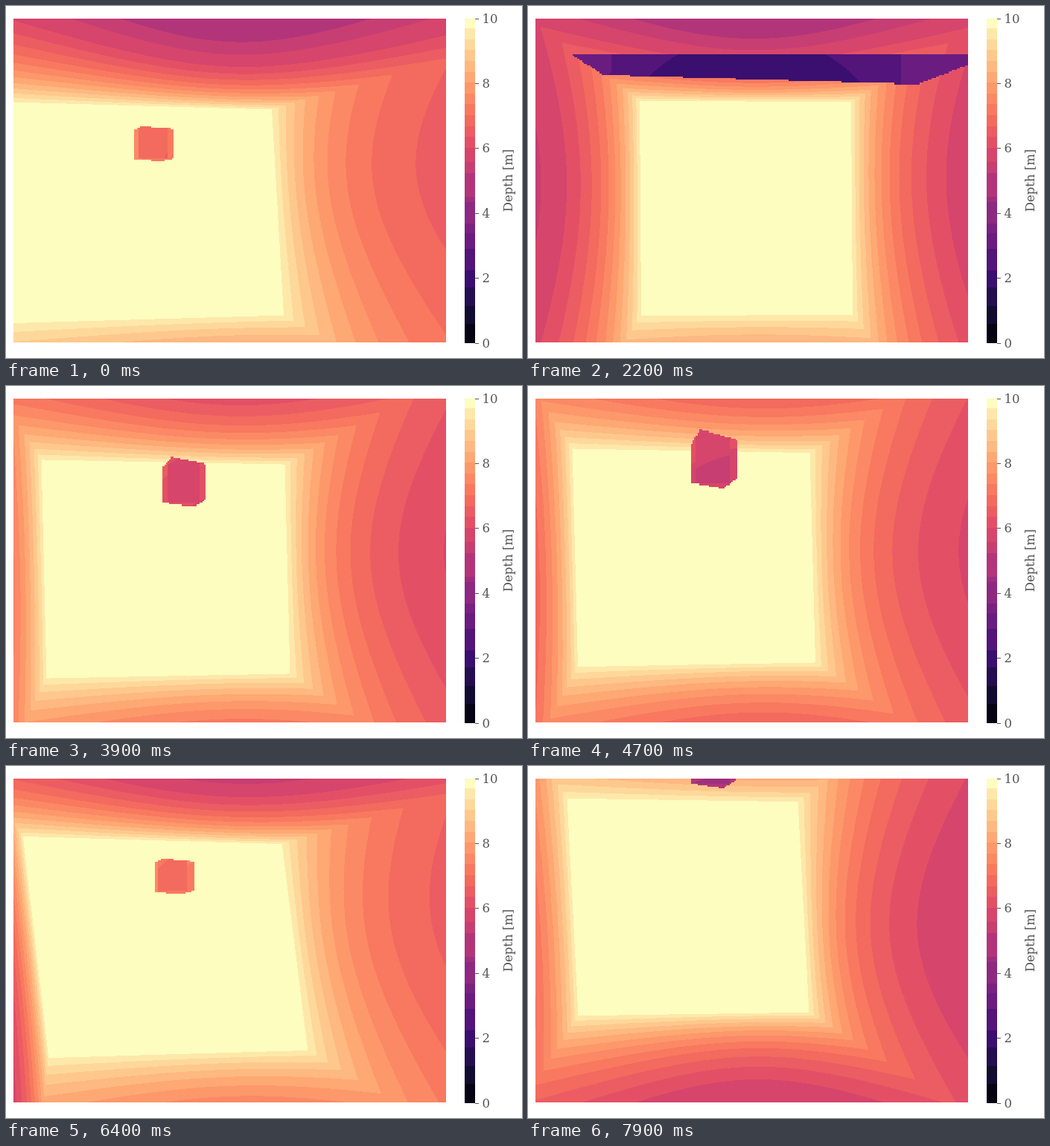
These frames come from a looping animation (693x474 px, 8000 ms). An HTML page with a canvas:

```html
<!DOCTYPE html>
<html>
<head>
<meta charset="utf-8">
<style>
html, body { margin: 0; width: 693px; height: 474px; overflow: hidden; background: #fff; }
canvas { display: block; }
</style>
</head>
<body>
<canvas id="stage" width="693" height="474"></canvas>
<script>
const g = document.getElementById('stage').getContext('2d');
const LEFT = 10, TOP = 17, W = 581, H = 436, CX = 300.5, CY = 235;
const FAR = 9.7;      // depth where the palest band starts
const OPENING = 288;  // height of the far opening on screen
const BEND = 120;     // how soon the contours start to curve
const FOCAL = 315, CELL = 2.15;

// Depth bands: even steps down to 6 m, coarser ones below.
const starts = Array.from({ length: 12 }, (_, i) => FAR - i * 0.3345)
  .concat(5.58, 5.24, 4.51, 4.35, 3.68, 3.39, 2.91, 2.24, 1.72, 1.14, 0.6, 0);
const stops = ['000004', '150e37', '3b0f70', '651a80', '8c2981', 'b73779', 'de4968', 'f7705c', 'fe9f6d', 'fecf92', 'fcfdbf']
  .map(h => [0, 2, 4].map(i => parseInt(h.slice(i, i + 2), 16)));
const mix = (a, b, k) => a.map((v, i) => v + (b[i] - v) * k);
const shade = d => {
  const i = Math.min(9, Math.floor(d));
  return mix(stops[i], stops[i + 1], d - i).map(Math.round);
};
const colors = starts.map((s, i) => shade(i ? (s + starts[i - 1]) / 2 : 10));
const lut = Uint32Array.from({ length: 1001 }, (_, i) => {
  const [r, gr, b] = colors[starts.findIndex(s => i / 100 >= s)];
  return (255 << 24 | b << 16 | gr << 8 | r) >>> 0;
});

// Key poses. room: opening centre x, y, width, lean, ceiling and left wall distance.
// block: left, right, top, bottom, distance, and 1 when seen as an overhead slab.
const keys = [
  { t: 0,    room: [175, 278, 380, 16, 4.6, 2.4],    block: [172, 226, 161, 208, 6.42, 0] },
  { t: 1100, room: [286.5, 254, 284, 2, 4.58, 5.7],  block: [183, 437, -2, 40, 1.9, 1] },
  { t: 2200, room: [293, 272.5, 284, 2, 4.27, 5.7],  block: [58, 592, 65, 105, 1.9, 1] },
  { t: 3900, room: [214.5, 246.5, 327, 7, 6, 3.9],   block: [210, 269, 95, 162, 5.42, 0] },
  { t: 5400, room: [230, 218, 312, 8, 6.6, 4.05],    block: [226, 293, 21, 113, 4.72, 0] },
  { t: 6400, room: [214, 244, 348, 34.5, 4.3, 2.1],  block: [199, 252, 124, 172, 6.45, 0] },
  { t: 7900, room: [215, 190, 310, 15, 7, 4.4],      block: [219, 280, -45, 30, 3.66, 0] }
];
const legs = [[0, 0], [1100, 1], [3000, 3], [6400, 5]]; // start time, first key

// Each wall is a line [a, b, c]: 0 on the opening's edge, growing outwards.
function walls([x, y, w, lean, up, left]) {
  const right = w / 22.3 - left, down = 13.4 - up;
  const drop = 0.45 * (right - left), hw = w / 2, hh = OPENING / 2, s = lean / 2;
  const corners = [
    [x - hw - s, y - hh - drop], [x + hw - s, y - hh + drop],
    [x + hw + s, y + hh - drop], [x - hw + s, y + hh + drop]
  ];
  return [up, right, down, left].map((dist, i) => {
    const [px, py] = corners[i], [qx, qy] = corners[(i + 1) % 4];
    const n = Math.hypot(qx - px, qy - py) * dist;
    const a = (qy - py) / n, b = (px - qx) / n;
    return [a, b, a * (CX - px) + b * (CY - py)];
  });
}

function outline([l, r, t, b, , slab]) {
  const e = Math.max(0, (b - t) / (r - l) - 0.55);
  const box = [[0.2, 0], [1, 0.25 * e], [1, 1 - 0.25 * e], [0.7, 1], [0, 1 - 0.13 * e], [0, 0.37 * e]];
  const plate = [[0.45, 0], [1, 0], [1, 0.33], [0.87, 1], [0.08, 0.68], [0, 0]];
  return box.map((p, i) => mix(p, plate[i], slab)).map(([x, y]) => [l + x * (r - l), t + y * (b - t)]);
}

function inside(poly, x, y) {
  let hit = false;
  poly.forEach(([ax, ay], i) => {
    const [bx, by] = poly[(i + 5) % 6];
    if ((ay > y) !== (by > y) && x < (bx - ax) * (y - ay) / (by - ay) + ax) hit = !hit;
  });
  return hit;
}

const img = g.createImageData(W, H), px = new Uint32Array(img.data.buffer);
const snap = v => (Math.floor(v / CELL) + 0.5) * CELL;

function render(t) {
  const first = legs.filter(l => l[0] <= t).pop()[1];
  const from = keys[first], to = keys[first + 1];
  let k = (t - from.t) / (to.t - from.t);
  if (k > 1) k = 1 + (k - 1) * 0.1; // nearly hovering
  const lines = walls(mix(from.room, to.room, k));

  // The block grows with the inverse of its distance.
  const z0 = from.block[4], z1 = to.block[4];
  const block = mix(from.block, to.block, k * z1 / (z0 + (z1 - z0) * k));
  const [l, r, top, bottom, z, slab] = block, poly = outline(block);
  const faceL = l + 0.1 * (r - l), faceR = l + 0.83 * (r - l);
  const faceB = top + (0.92 + 0.08 * slab) * (bottom - top);

  for (let y = 0, o = 0; y < H; y++) {
    const v = y + TOP + 0.5 - CY, sy = snap(y) + TOP;
    for (let x = 0; x < W; x++, o++) {
      const u = x + LEFT + 0.5 - CX, rr = u * u + v * v, sx = snap(x) + LEFT;
      let d;
      if (sx > l && sx < r && sy > top && sy < bottom && inside(poly, sx, sy)) {
        const face = sx > faceL && sx < faceR && sy < faceB;
        d = z * (face ? 1 : 1.07 + 0.15 * slab) * Math.sqrt(1 + rr / FOCAL ** 2);
      } else {
        let out = -1e-4;
        for (const [a, b, c] of lines) out = Math.max(out, a * u + b * v + c);
        d = 1 / (1 / FAR + out / Math.sqrt(rr + BEND * BEND));
      }
      px[o] = lut[Math.min(1000, Math.floor(d * 100 + 1e-3))];
    }
  }
  g.putImageData(img, LEFT, TOP);
}

function scale() {
  g.fillStyle = '#fff';
  g.fillRect(0, 0, 693, 474);
  let y = TOP;
  starts.forEach((s, i) => {
    const end = Math.round(454 - s * 43.7);
    g.fillStyle = `rgb(${colors[i]})`;
    g.fillRect(616, y, 14, end - y);
    y = end;
  });
  g.fillStyle = '#555';
  g.font = '16.5px "DejaVu Serif", serif';
  for (let n = 0; n <= 10; n += 2) {
    const ty = Math.round(453.5 - n * 43.7);
    g.fillRect(630, ty, 5, 1);
    g.fillText(n, 639.5, ty + 6);
  }
  g.translate(680, 235);
  g.rotate(-Math.PI / 2);
  g.textAlign = 'center';
  g.fillText('Depth [m]', 0, 0);
  g.setTransform(1, 0, 0, 1, 0, 0);
}

let shown = -1;
function tick() {
  const t = Math.floor(performance.now() / 100) * 100 % 8000;
  if (t !== shown) render(shown = t);
  requestAnimationFrame(tick);
}
scale();
tick();
</script>
</body>
</html>
```
